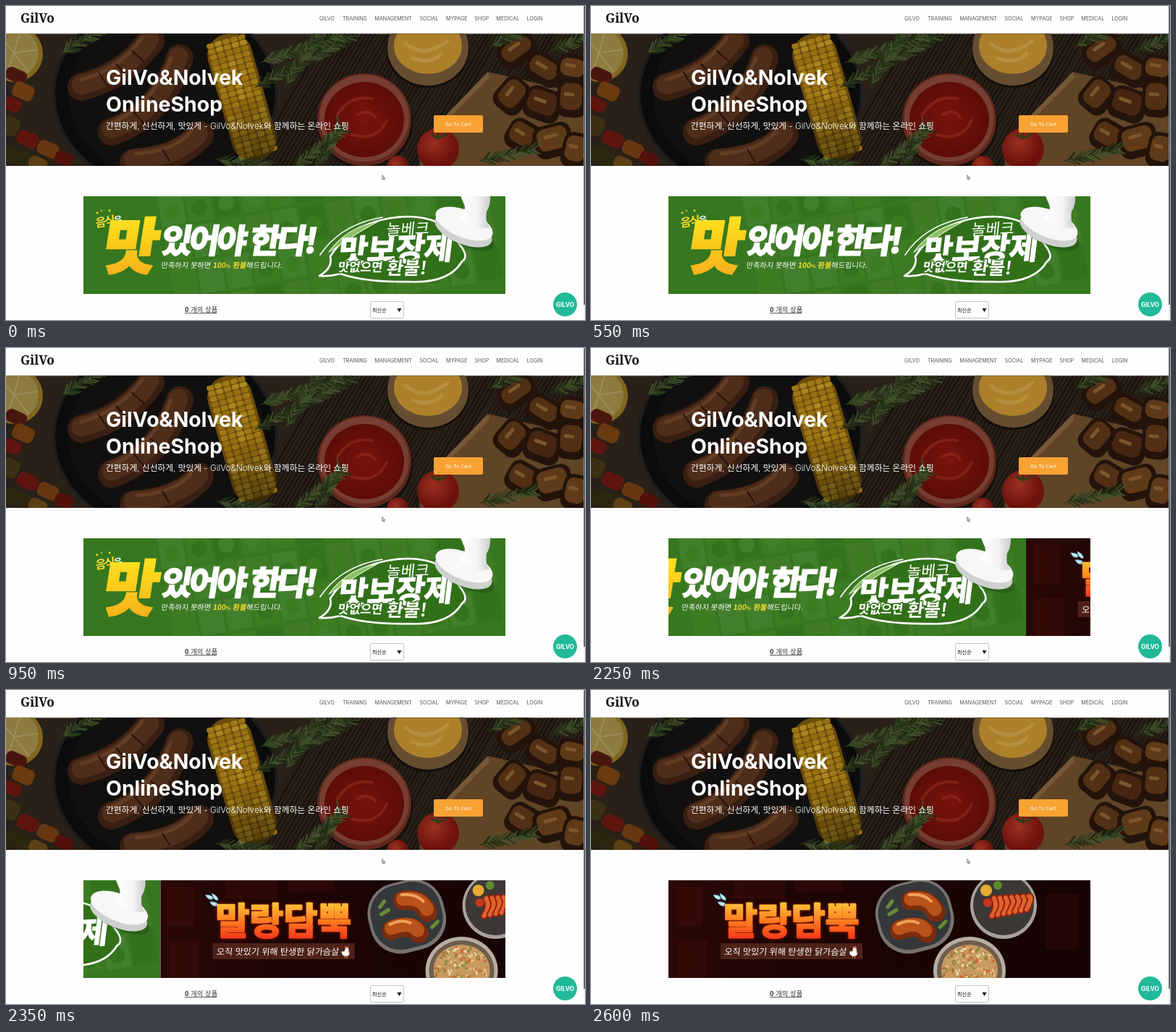
These frames come from a looping animation (800 px wide and 434 px high, 2750 ms). An HTML page:

```html
<!DOCTYPE html>
<html lang="ko">
<head>
<meta charset="utf-8">
<title>Online shop</title>
<style>
html, body { margin: 0; width: 100%; height: 100%; overflow: hidden; background: #fefefe; }
svg { display: block; }
#page { width: 800px; height: 434px; }
text { font-family: Inter, 'Noto Sans CJK KR', 'Noto Sans CJK', sans-serif; white-space: pre; }
.ko { font-family: 'Noto Sans CJK KR', 'Noto Sans CJK', sans-serif; }
.heavy { font-weight: 900; }
.glow { filter: drop-shadow(0 0 2px #8a1408); }
.round { fill: none; stroke-linecap: round; stroke-linejoin: round; }
</style>
</head>
<body>
<svg id="page" viewBox="0 0 800 434">
  <defs>
    <linearGradient id="gold" x2="0" y2="1">
      <stop stop-color="#fff02a"/><stop offset=".4" stop-color="#fcd41c"/><stop offset="1" stop-color="#f6a81b"/>
    </linearGradient>
    <linearGradient id="fire" x2="0" y2="1">
      <stop offset=".2" stop-color="#ffc53a"/><stop offset=".55" stop-color="#ff7a1f"/><stop offset=".9" stop-color="#f5321b"/>
    </linearGradient>
    <linearGradient id="night">
      <stop stop-color="#2a0805"/><stop offset=".3" stop-color="#1d0504"/><stop offset="1" stop-color="#160303"/>
    </linearGradient>
    <linearGradient id="chrome">
      <stop stop-color="#fff"/><stop offset=".6" stop-color="#f4f4f4"/><stop offset="1" stop-color="#c9cbc9"/>
    </linearGradient>
    <linearGradient id="shade" x2="0" y2="1">
      <stop offset=".5" stop-opacity="0"/><stop offset="1" stop-opacity=".45"/>
    </linearGradient>
    <radialGradient id="tomato" cx=".4" cy=".35">
      <stop stop-color="#c9402a"/><stop offset="1" stop-color="#8e1810"/>
    </radialGradient>
    <radialGradient id="ketchup">
      <stop stop-color="#9c1a10"/><stop offset="1" stop-color="#78100a"/>
    </radialGradient>
  </defs>

  <rect width="800" height="434" fill="#fefefe"/>
  <text x="20" y="23" font-size="17.2" style="font-family:'Noto Serif',serif" class="heavy" fill="#111">GilVo</text>
  <g id="nav" font-size="7.1" fill="#555"></g>
  <rect y="37.5" width="798" height="1" fill="#ccc"/>

  <svg y="38.5" width="798" height="182.5" viewBox="0 38.5 798 182.5">
    <rect y="38" width="798" height="184" fill="#35291f"/>
    <g id="grain" stroke="#17110e" opacity=".7"></g>

    <circle cx="12" cy="66" r="39" fill="#a8852c"/>
    <circle cx="11" cy="65" r="34" fill="#b7a052"/>
    <path d="M11 65L-10 40M11 65L20 33M11 65L44 60M11 65L32 92M11 65L0 98" stroke="#c9b878" stroke-width="2"/>

    <ellipse cx="220" cy="122" rx="154" ry="132" fill="#0e0e0f" stroke="#262628" stroke-width="4"/>
    <ellipse cx="222" cy="122" rx="136" ry="116" fill="#161514"/>
    <g class="round">
      <g stroke="#4a2818" stroke-width="38"><path d="M104 112Q166 96 200 48M146 174Q214 150 240 72M176 216Q240 212 268 178"/></g>
      <g stroke="#653a22" stroke-width="27"><path d="M104 109Q164 94 198 46M146 170Q212 146 238 70M176 212Q238 208 266 176"/></g>
      <g stroke="#8a5936" stroke-width="5" opacity=".7"><path d="M104 102Q156 88 188 44M146 162Q202 138 228 72M180 204Q230 202 256 174"/></g>
      <g stroke="#2f170d" stroke-width="2"><path d="M128 92l12 18M152 80l14 16M174 62l16 14M176 146l14 16M200 126l18 14M218 98l20 10M216 198l10 16"/></g>
    </g>
    <g id="corn" transform="translate(326 126) rotate(-16)"></g>
    <rect x="-31" y="-90" width="62" height="180" rx="29" transform="translate(326 126) rotate(-16)" fill="url(#shade)"/>

    <g id="skewer"></g>

    <ellipse cx="496" cy="162" rx="66" ry="63" fill="#120d0b" opacity=".7"/>
    <ellipse cx="495" cy="157" rx="65" ry="64" fill="#7d3326"/>
    <ellipse cx="495" cy="155" rx="62" ry="60" fill="#99503f"/>
    <ellipse cx="495" cy="157" rx="55" ry="52" fill="url(#ketchup)"/>
    <path class="round" d="M458 150q18-28 48-22M478 178q34 10 48-20M486 150q16-8 24 4" stroke="#c9402f" stroke-width="4" opacity=".5"/>

    <ellipse cx="583" cy="62" rx="57" ry="51" fill="#18110d"/>
    <ellipse cx="583" cy="58" rx="56" ry="52" fill="#83643f"/>
    <ellipse cx="583" cy="55" rx="47" ry="39" fill="#e0a636"/>
    <path class="round" d="M552 52q26 22 58-4M562 72q24 10 40-6" stroke="#f2c867" stroke-width="5" opacity=".6"/>

    <path d="M666 91L800 122V222H572L570 190Z" fill="#7d5831"/>
    <path d="M666 91L570 190v8L668 99Z" fill="#9a7246"/>
    <g id="meat"></g>

    <g id="herbs" stroke-width="1.7" stroke-linecap="round"></g>
    <circle cx="597" cy="198" r="29" fill="url(#tomato)"/>
    <circle cx="541" cy="222" r="15" fill="url(#tomato)"/>
    <path class="round" d="M588 178l9 5 12-6M597 183v-11" stroke="#39501d" stroke-width="3"/>

    <rect y="38" width="798" height="184" opacity=".23"/>
    <g fill="#fff">
      <g font-size="28.4" font-weight="700"><text x="138" y="109">GilVo&amp;Nolvek</text><text x="138" y="146">OnlineShop</text></g>
      <text x="138" y="170" font-size="11.75" font-weight="300">간편하게, 신선하게, 맛있게 - GilVo&amp;Nolvek와 함께하는 온라인 쇼핑</text>
      <rect x="591" y="151" width="68" height="24" rx="2" fill="#f7a233"/>
      <text x="607" y="166" font-size="7.3" style="font-family:'Noto Sans',sans-serif">Go To Cart</text>
    </g>
  </svg>

  <svg x="107" y="263" width="583" height="135" viewBox="107 263 583 135">
    <g id="track">
      <rect x="107" y="263" width="583" height="135" fill="#36771f"/>
      <g id="cards" transform="rotate(-10 400 330)" opacity=".06"></g>

      <g fill="#f9dc2b">
        <circle cx="126" cy="286" r="1.4"/><circle cx="132" cy="283" r="1"/><circle cx="143" cy="283" r="1.4"/>
        <text class="ko" transform="translate(124 306) rotate(-10) skewX(-6)" font-size="16" font-weight="700" letter-spacing="-2">음식<tspan fill="#fff" font-size="13">은</tspan></text>
      </g>
      <text class="ko heavy" transform="translate(131 362) skewX(-9)" font-size="82" fill="url(#gold)" stroke="url(#gold)" stroke-width="5">맛</text>
      <g fill="#fff">
        <text class="ko heavy" transform="translate(213 341) skewX(-9)" font-size="45.5" letter-spacing="-4" stroke="#fff" stroke-width="2.4">있어야 한다!</text>
        <text class="ko" transform="translate(214 362) skewX(-8)" font-size="10.2">만족하지 못하면 <tspan fill="#f9dc2b" font-weight="700">100<tspan font-size="7">%</tspan> 환불</tspan>해드립니다.</text>
      </g>

      <g class="round" stroke="#fff" stroke-width="2.6">
        <path d="M433 373Q452 362 448 346Q484 292 556 291Q606 292 622 324Q642 346 630 353Q612 384 556 381Q496 382 462 370Q448 374 433 373Z" fill="#317019"/>
        <path d="M434 344Q462 302 520 292" stroke-width="1.6"/>
        <path d="M446 340Q470 306 514 298Q484 314 472 324Z" fill="#8cc063" stroke-width="1"/>
      </g>
      <g fill="#fff" stroke="#fff">
        <text class="ko" transform="translate(525 317) rotate(-2) skewX(-8)" font-size="21.5" font-weight="500" stroke="none">놀베크</text>
        <text class="ko heavy" transform="translate(458 355) rotate(-2) skewX(-9)" font-size="43.5" letter-spacing="-.6" stroke-width="1.4">맛보장제</text>
        <g stroke="#317019" stroke-width="3" paint-order="stroke" stroke-linejoin="round">
          <text class="ko" transform="translate(458 367) skewX(-8)" font-size="17" font-weight="700" letter-spacing="-.3">맛없으면</text>
          <text class="ko heavy" transform="translate(525 371) skewX(-8)" font-size="25">환불!</text>
        </g>
      </g>

      <ellipse cx="635" cy="315" rx="43" ry="17" transform="rotate(24 635 315)" fill="#1d4a12" opacity=".45"/>
      <ellipse cx="632" cy="310" rx="42" ry="19" transform="rotate(22 632 310)" fill="#cfd1cf"/>
      <ellipse cx="633" cy="301" rx="42" ry="19" transform="rotate(22 633 301)" fill="#f7f7f7"/>
      <path d="M627 260L669 260Q670 276 664 284Q662 300 668 306Q646 312 626 292Q638 282 632 272Z" fill="url(#chrome)"/>

      <g transform="translate(583)">
        <rect x="107" y="263" width="583" height="135" fill="url(#night)"/>
        <g fill="#6b1810" opacity=".18">
          <rect x="118" y="272" width="36" height="54"/><rect x="196" y="263" width="72" height="26"/><rect x="282" y="258" width="66" height="22"/><rect x="628" y="282" width="46" height="76"/><rect x="120" y="346" width="40" height="52"/>
        </g>
        <path d="M169 283q11 0 10 6q-7 2-10-6zM178 281q10 5 8 10q-7-1-8-10zM175 293q11-1 12 5q-8 3-12-5z" fill="#bfe9f2" stroke="#4fa3b8" stroke-width=".7"/>
        <text class="ko heavy glow" x="183" y="338" font-size="51" fill="url(#fire)" stroke="url(#fire)" stroke-width="2.4" stroke-linejoin="round">말랑담뿍</text>
        <rect x="179" y="350" width="196" height="22" fill="#4d2119"/>
        <text class="ko" transform="translate(184 365.5) skewX(-5)" font-size="12.1" font-weight="500" fill="#fff">오직 맛있기 위해 탄생한 닭가슴살</text>
        <path d="M357 361q5 2 5-4q5-3 5 3q3 8-4 8q-6 0-6-7z" fill="#fff"/>
        <path d="M361 356l1-2 2 1 2-1 1 3zM366 361l3 1-3 1zM361 368h1v3h-1zM364 368h1v3h-1z" fill="#ef6a32"/>

        <g transform="rotate(-14 447 312)">
          <rect x="394" y="264" width="106" height="98" rx="42" fill="#77736e"/>
          <rect x="398" y="267" width="98" height="90" rx="39" fill="#34383b"/>
        </g>
        <g class="round">
          <g stroke="#7a2c0e" stroke-width="27"><path d="M442 291q24-4 34 16M426 332q26-10 38 4"/></g>
          <g stroke="#b9521b" stroke-width="19"><path d="M442 289q24-4 33 14M426 329q26-10 36 3"/></g>
          <path d="M440 283q20-2 30 9M424 324q16-8 28-2" stroke="#f0a25a" stroke-width="4"/>
          <path d="M410 300l6-8M412 310l10-6M482 328l8-8" stroke="#668b35" stroke-width="5"/>
        </g>

        <circle cx="570" cy="298" r="46" fill="#a7a19b"/>
        <circle cx="570" cy="297" r="42" fill="#3b3836"/>
        <g id="slices" class="round"></g>
        <circle cx="546" cy="277" r="8" fill="#e6a932"/><circle cx="562" cy="270" r="6" fill="#5f8a30"/><circle cx="548" cy="294" r="6" fill="#c8361c"/>

        <ellipse cx="523" cy="388" rx="50" ry="47" fill="#b7aea4"/>
        <ellipse cx="523" cy="388" rx="45" ry="42" fill="#6f5c4c"/>
        <ellipse cx="523" cy="387" rx="39" ry="35" fill="#c79a61"/>
        <g id="rice"></g>
      </g>
    </g>
  </svg>

  <g fill="#333">
    <text class="ko" x="247" y="422.5" font-size="9.4"><tspan font-weight="700">0</tspan> 개의 상품</text>
    <rect x="247" y="424" width="44" height=".8"/>
  </g>
  <rect x="503.5" y="408.5" width="46" height="23" rx="1" fill="#fff" stroke="#c4c4c4"/>
  <text class="ko" x="506" y="423" font-size="7.2" fill="#111">최신순</text>
  <path d="M540.5 418h6l-3 5z" fill="#111"/>

  <path d="M519.8 233.5v6l1.3-1.1 1 2 1-.5-.9-1.9h1.7z" fill="#ccc" stroke="#555" stroke-width=".6"/>
  <circle cx="772.5" cy="412.5" r="16.5" fill="#21b998"/>
  <text x="772.5" y="415.7" font-size="8.4" font-weight="700" fill="#fff" text-anchor="middle">GILVO</text>
  <rect x="798" width="2" height="434" fill="#f0f0f0"/>
  <rect x="798.3" width="1.7" height="413" fill="#55565a"/>
</svg>

<script>
const LOOP = 2750, STEP = 50, SLIDE_START = 2215, SLIDE_TIME = 262, SLIDE_WIDTH = 583;
const byId = id => document.getElementById(id);
let seed = 7;
const random = (min, max) => {
  seed = seed * 16807 % 2147483647;
  return min + (max - min) * seed / 2147483647;
};
const pick = list => list[Math.floor(random(0, list.length))];
const fill = (id, count, draw) => byId(id).innerHTML = Array.from({ length: count }, (_, i) => draw(i)).join('');
const line = (x, y, dx, dy, attrs = '') => `<path d="M${x} ${y}l${dx} ${dy}" ${attrs}/>`;
const block = (x, y, w, h, color, angle = 0, r = 2) =>
  `<rect x="${x - w / 2}" y="${y - h / 2}" width="${w}" height="${h}" rx="${r}" fill="${color}" transform="rotate(${angle} ${x} ${y})"/>`;

const links = [['GILVO', 433], ['TRAINING', 465], ['MANAGEMENT', 509.5], ['SOCIAL', 571.5],
  ['MYPAGE', 608], ['SHOP', 647.5], ['MEDICAL', 677.5], ['LOGIN', 719.5]];
fill('nav', links.length, i => `<text x="${links[i][1]}" y="20">${links[i][0]}</text>`);

fill('grain', 84, i => line(330 + i * 6, 225, 110, -190, `stroke-width="${random(.6, 3)}"`));

fill('corn', 106, i => {
  if (!i) return block(0, 0, 62, 180, '#8c6410', 0, 29);
  const col = (i - 1) % 5 - 2, row = Math.floor((i - 1) / 5) - 10;
  return block(col * 11.3, row * 8, 10, 7, pick(['#d09c1e', '#dcae28', '#c48f16']), 0, 3);
});

const veg = [[14, 96, 30, 18, '#5f1d12'], [24, 118, 30, 22, '#8a4c15'], [8, 136, 26, 18, '#7c1b12'],
  [6, 166, 24, 26, '#4b3e19'], [30, 184, 30, 20, '#7c1b12'], [58, 198, 30, 20, '#864817'],
  [16, 208, 34, 22, '#383214'], [80, 211, 26, 18, '#6b170e'], [44, 218, 26, 18, '#79521a']];
fill('skewer', veg.length, i => block(...veg[i], 24, 7));

const chunks = [[706, 62, 50, 32, -35], [744, 88, 46, 34, 30], [784, 88, 40, 34, 10], [700, 124, 44, 38, -50],
  [742, 136, 46, 40, 20], [782, 128, 36, 46, 5], [714, 180, 40, 38, 30], [756, 186, 48, 40, -15], [788, 200, 34, 44, 12]];
fill('meat', chunks.length, i => {
  const [x, y, w, h, angle] = chunks[i];
  return block(x, y, w + 6, h + 6, '#2e190d', angle, 14) + block(x - 1, y - 3, w - 6, h - 9, pick(['#6b3f1b', '#7b4c20', '#5c3216']), angle, 10)
    + block(x - 4, y - 6, w * .4, 5, '#a0703a', angle, 3);
});

const sprigs = [[345, 112, 150, -28], [352, 78, 120, -18], [385, 112, 110, -58], [395, 226, 90, -38], [428, 228, 70, -62],
  [76, 66, 60, -30], [290, 212, 70, 8], [668, 56, 60, -25], [752, 62, 50, -20], [655, 214, 75, -12]];
fill('herbs', sprigs.length, i => {
  const [x, y, length, angle] = sprigs[i];
  let needles = line(0, 0, length, 0, 'stroke="#3a3c20"');
  for (let d = 4; d < length; d += 3.2)
    for (const side of [-1, 1])
      needles += line(d, 0, random(8, 13), side * random(5, 10), `stroke="${pick(['#3c5024', '#566a38', '#2c3b1d'])}"`);
  return `<g transform="translate(${x} ${y}) rotate(${angle})">${needles}</g>`;
});

fill('cards', 48, i => {
  const x = 240 + i % 12 * 38, y = 252 + Math.floor(i / 12) * 50;
  return block(x, y, 34, 45, pick(['#fff', '#b9d67a', '#0c3306', '#d8c890']))
    + `<circle cx="${x}" cy="${y + 4}" r="11" fill="${pick(['#fff', '#163f0c', '#a6b860'])}"/>`;
});

fill('slices', 7, i => {
  const curve = `M${554 + i * 8} ${312 - i * 1.5}q9-${12 + i} 3-${24 - i}`;
  return `<path d="${curve}" stroke="#8d2410" stroke-width="10"/><path d="${curve}" stroke="#e2622b" stroke-width="6"/>`;
});

fill('rice', 170, () => {
  const a = random(0, 6.28), r = Math.sqrt(random(0, 1));
  return block(523 + Math.cos(a) * r * 37, 386 + Math.sin(a) * r * 33, 5, 2.4,
    pick(['#e6c48c', '#f0d9ac', '#b9854a', '#d0a263', '#c8642c', '#7d8a3c']), random(0, 180), 1);
});

// CSS "ease": cubic-bezier(.25, .1, .25, 1)
function ease(x) {
  if (x <= 0 || x >= 1) return x <= 0 ? 0 : 1;
  const bezier = (a, b, s) => 3 * a * s * (1 - s) ** 2 + 3 * b * s * s * (1 - s) + s ** 3;
  let low = 0, high = 1;
  for (let i = 0; i < 24; i++) {
    const mid = (low + high) / 2;
    if (bezier(.25, .25, mid) < x) low = mid; else high = mid;
  }
  return bezier(.1, 1, low);
}

const track = byId('track');
function render(now) {
  const time = Math.floor(now % LOOP / STEP) * STEP;
  const shift = SLIDE_WIDTH * ease((time - SLIDE_START) / SLIDE_TIME);
  track.setAttribute('transform', `translate(${-shift.toFixed(2)} 0)`);
  requestAnimationFrame(render);
}
render(performance.now());
</script>
</body>
</html>
```
